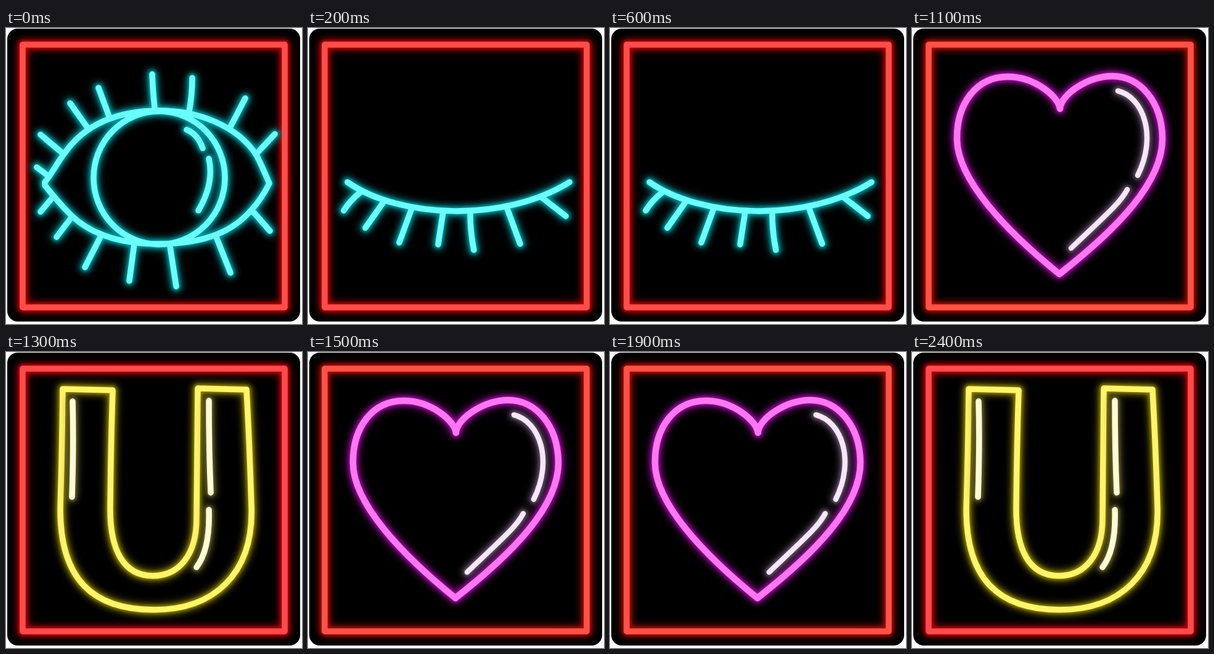
An HTML page that plays this animation: 480x480 px, repeating every 2900 ms.

```html
<!DOCTYPE html>
<html lang="en">
<head>
<meta charset="utf-8">
<title>Neon sign</title>
<style>
  html, body { margin: 0; width: 100%; height: 100%; overflow: hidden; background: #fff; }
  svg { display: block; width: 100vw; height: 100vh; }
  path { fill: none; stroke-linecap: round; stroke-linejoin: round; }
  .halo { filter: blur(6px); opacity: .62; }
  .rim { filter: blur(2.5px); opacity: .7; }
  .tube { filter: blur(.5px); }
</style>
</head>
<body>
<svg viewBox="0 0 480 480">
  <clipPath id="plate"><rect x="2" y="1" width="475" height="475" rx="17"/></clipPath>
  <g id="sign" clip-path="url(#plate)">
    <rect width="480" height="480" fill="#000"/>
  </g>
</svg>
<script>
const LOOP = 2900;
const NS = 'http://www.w3.org/2000/svg';
const sign = document.getElementById('sign');

// Start time of each scene change
const STEPS = [
  [0, 'open'], [200, 'shut'], [400, 'open'], [600, 'shut'],
  [1100, 'heart'], [1300, 'letter'], [1500, 'heart'],
  [1700, 'letter'], [1900, 'heart'], [2400, 'letter']
];

const FRAME = 'M27 27H452V453H27Z';

const OPEN = `M63 250C75 235 84 217 95 203C125 160 175 134 250 134
  C310 134 375 158 406 206C414 221 421 238 427 252
  C420 266 410 282 398 295C372 325 330 351 243 350
  C175 350 130 328 105 303C90 288 77 273 63 255Z
  M142 243a106.5 108 0 1 0 213 0a106.5 108 0 1 0 -213 0
  M293 165Q311 172 319 195M329 212Q338 252 312 296
  M237 75Q238 102 241 130M302 81Q302 108 297 136M150 97L167 143
  M104 122L131 160M56 173L93 204M50 226L70 241
  M388 114L363 162M436 172L405 205M56 298L77 273
  M82 339L107 306M128 388L153 339M200 410L208 350
  M276 419L266 354M364 397L341 339M428 329L399 296`;

const SHUT = `M64 250C150 310 320 315 424 250
  M58 296Q68 280 84 267M93 324L122 283M148 348L168 293
  M211 351L219 299M269 360Q263 330 263 300M344 350L323 293M418 305L378 274`;

const HEART = `M240 131C238 112 200 79 155 79C105 79 72 122 73 181
  C74 245 150 327 239 399C332 326 407 250 406 178
  C405 120 370 78 325 78C285 78 241 108 240 131`;
const HEART_SHINE = `M334 102C375 112 398 175 366 239
  M349 262C338 283 318 300 258 357`;

const LETTER = `M92 60Q91 160 88 255C88 368 140 418 240 418
  C335 418 402 362 398 250Q395 150 390 61L311 59L309 270
  C309 330 280 363 238 363C190 363 168 320 169 250Q170 150 173 62Z`;
const LETTER_SHINE = `M108 80Q110 150 107 235M329 79Q329 160 332 228
  M329 256Q331 320 309 349`;

function add(parent, tag, attrs) {
  const el = document.createElementNS(NS, tag);
  for (const key in attrs) el.setAttribute(key, attrs[key]);
  return parent.appendChild(el);
}

function neon(parent, d, color, glow, width) {
  add(parent, 'path', { d, class: 'halo', stroke: glow, 'stroke-width': width + 9 });
  add(parent, 'path', { d, class: 'rim', stroke: glow, 'stroke-width': width + 4 });
  add(parent, 'path', { d, class: 'tube', stroke: color, 'stroke-width': width });
}

function scene(name, frameColor, frameGlow, tubes) {
  const g = add(sign, 'g', {});
  neon(g, FRAME, frameColor, frameGlow, 9.5);
  tubes.forEach(tube => neon(g, ...tube));
  const keys = STEPS.map(([at, shown]) => ({
    offset: at / LOOP,
    opacity: shown === name ? 1 : 0,
    easing: 'steps(1, end)'
  }));
  keys.push({ ...keys[keys.length - 1], offset: 1 });
  g.animate(keys, { duration: LOOP, iterations: Infinity });
}

const CYAN = ['#6bfffc', '#00b4bd', 9.5];
scene('open', '#ff4d4a', '#dc0808', [[OPEN, ...CYAN]]);
scene('shut', '#ff4d4a', '#dc0808', [[SHUT, ...CYAN]]);
scene('heart', '#ff5147', '#c81408', [
  [HEART, '#ff76f2', '#b010b4', 10.5],
  [HEART_SHINE, '#f7e6fb', '#75607c', 8.5]
]);
scene('letter', '#ff4a4c', '#dc0810', [
  [LETTER, '#fff46a', '#a89a00', 9.5],
  [LETTER_SHINE, '#fffbd2', '#777039', 9.5]
]);
</script>
</body>
</html>
```
